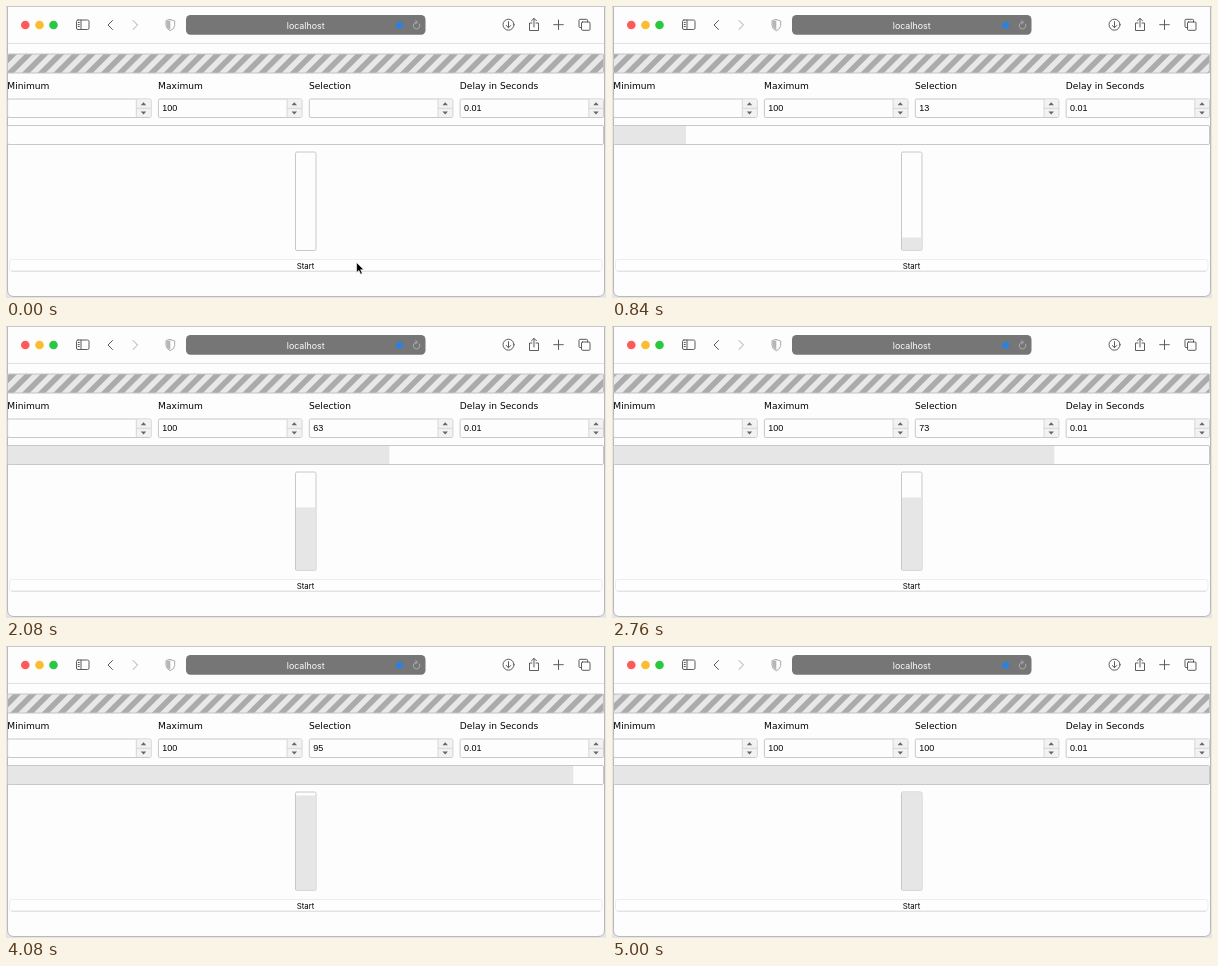
Recreate the animation shown at these times as an HTML page. Size 600x292 px, loop 5280 ms.

```html
<!DOCTYPE html>
<html lang="en">
<head>
<meta charset="utf-8">
<title>Progress bars</title>
<style>
  html, body { margin: 0; width: 100%; height: 100%; overflow: hidden; background: #e9e9e9; }
  svg { display: block; width: 600px; height: 292px; }
  text { fill: #000; font: 9px "Liberation Sans", Arial, sans-serif; }
  .label { font: 9.1px "DejaVu Sans", Verdana, sans-serif; }
  .address { font: 8.9px Inter, sans-serif; fill: #fff; }
  .start { font: 7.8px Inter, sans-serif; }
  .box { fill: #fefdfe; stroke: #c9c8c9; }
  .fill { fill: #e7e6e7; }
  .icon { fill: none; stroke: #5c5c5c; stroke-linecap: round; stroke-linejoin: round; }
  .faint { stroke: #a9a9a9; }
</style>
</head>
<body>
<svg viewBox="0 0 600 292">
  <defs>
    <clipPath id="stripClip"><rect x="2" y="48" width="596" height="19"/></clipPath>
  </defs>
  <path d="M0 0H600V292H0Z" fill="#e4e4e4"/>
  <path d="M1.5 0V284Q1.5 290.5 8 290.5H592Q598.5 290.5 598.5 284V0Z" fill="#fefdfe" stroke="#b9b9b9"/>
  <path d="M0 .5H600" stroke="#c9c9c9"/>
  <path d="M2 37.5H598" stroke="#e3e2e3"/>

  <circle cx="19.3" cy="19" r="4.3" fill="#fc5b57"/>
  <circle cx="33.5" cy="19" r="4.3" fill="#fdbc2e"/>
  <circle cx="47.5" cy="19" r="4.3" fill="#29c840"/>
  <g class="icon">
    <rect x="70.5" y="14" width="12.5" height="9.5" rx="1.5"/>
    <path d="M75 14V23.500M72.200 16.500H73.300M72.200 18.500H73.300M72.200 20.500H73.300"/>
    <path d="M106.500 14.500 102 19 106.500 23.500"/>
    <path class="faint" d="M127 14.500 131.500 19 127 23.500"/>
    <path class="faint" d="M164.300 13.500 168.700 15V19.500Q168.300 23 164.300 24.700 160.300 23 160 19.500V15Z"/>
    <circle cx="502.500" cy="18.700" r="5.500"/>
    <path d="M502.500 15.700V21.500M500.300 19.500 502.500 21.700 504.700 19.500"/>
    <path d="M526 17H523.500V24.500H532.500V17H530M528 21V12.500M525.500 14.800 528 12.300 530.500 14.800"/>
    <path d="M552.500 14V23.500M547.700 18.700H557.300"/>
    <path d="M575.500 21.500H574Q573 21.500 573 20.500V14.300Q573 13.300 574 13.300H580.500Q581.500 13.300 581.500 14.300V16"/>
    <rect x="575.500" y="16" width="8.500" height="8.300" rx="1"/>
  </g>
  <path d="M164.300 14.200 160.500 15.200V19.500Q161 22.500 164.300 24Z" fill="#b5b5b5"/>

  <rect x="180" y="9" width="239.500" height="19.700" rx="4.500" fill="#777677"/>
  <text class="address" x="299.700" y="22.500" text-anchor="middle">localhost</text>
  <path d="M390 17.500H392L395.200 15V23.500L392 21H390Z" fill="#1685fb"/>
  <path d="M396.800 17Q398.300 19.200 396.800 21.500" fill="none" stroke="#1685fb"/>
  <path d="M413.300 17.800A3.300 3.300 0 1 1 410.300 16.300M409.300 14.300 411.500 16.300 409.300 18" fill="none" stroke="#bbb" stroke-width=".8"/>

  <g clip-path="url(#stripClip)">
    <rect x="2" y="48" width="596" height="19" fill="#e9e8e9"/>
    <path id="stripes" fill="#acabac"/>
  </g>
  <rect x="1.500" y="48" width="596" height="19" rx="1" fill="none" stroke="#c4c3c4"/>

  <g id="fields"></g>

  <rect class="box" x="1.500" y="119.500" width="596" height="19" rx="1.500"/>
  <rect class="fill" id="across" x="2" y="120" height="18"/>
  <rect class="box" x="289.500" y="146" width="20.500" height="98.500" rx="1.500"/>
  <rect class="fill" id="upright" x="290" width="19.500"/>

  <rect x="3.500" y="253.500" width="592.500" height="11.500" rx="2.500" fill="#fefefe" stroke="#ededed"/>
  <path d="M5.500 265.300H594" stroke="#d9d9d9" stroke-width=".8"/>
  <text class="start" x="299.500" y="262.500" text-anchor="middle">Start</text>

  <path id="pointer" d="M0 0V10L2.300 7.900 4 11.700 5.700 11 4 7.200H7.200Z" fill="#000" stroke="#fff" stroke-width=".6"/>
</svg>
<script>
const LOOP = 5280;
const PITCH = 15.75;
const $ = id => document.getElementById(id);

// Each step: start time, selection, horizontal bar percent, stripe offset
const steps = [
  [0, 0, 0, 0], [280, 0, 0, 4], [560, 0, 0, 8], [840, 13, 12.1, 12],
  [1160, 29, 28, 2], [1480, 42, 43, 8], [1760, 55, 55, 12], [2080, 63, 64.1, 0],
  [2400, 69, 69, 5], [2760, 73, 74, 10], [3440, 86, 84.9, 12], [4080, 95, 95, 4],
  [4400, 100, 100, 0], [4720, 100, 100, 4], [5000, 100, 100, 8]
];

let bands = "";
for (let x = -3 * PITCH; x < 620; x += PITCH) bands += `M${x} 67l19-19h${PITCH / 2}l-19 19z`;
$("stripes").setAttribute("d", bands);

function field(x, label, value, id = "") {
  return `<text class="label" x="${x}" y="83">${label}</text>
    <rect class="box" x="${x + .3}" y="93" width="143.5" height="18.5" rx="1.5"/>
    <path d="M${x + 129} 93.500H${x + 143.300}V111H${x + 129}Z" fill="#f3f2f3"/>
    <path d="M${x + 129} 93V111.500M${x + 129} 102.300H${x + 143.500}" stroke="#d0cfd0" stroke-width=".8"/>
    <path d="M${x + 133.500} 99.300l2.700-3 2.700 3zM${x + 133.500} 105.500l2.700 3 2.700-3z" fill="#666"/>
    <text id="${id}" x="${x + 4.200}" y="105.300">${value}</text>`;
}
$("fields").innerHTML =
  field(1.3, "Minimum", "") + field(152.1, "Maximum", "100") +
  field(303, "Selection", "", "selection") + field(453.8, "Delay in Seconds", "0.01");

function draw(now) {
  const time = now % LOOP;
  const [start, value, percent, offset] = steps.findLast(step => step[0] <= time);
  const height = Math.min(value, 98);
  $("selection").textContent = value || "";
  $("across").setAttribute("width", percent * 5.95);
  $("upright").setAttribute("y", 244.5 - height);
  $("upright").setAttribute("height", height);
  $("stripes").setAttribute("transform", `translate(${offset})`);
  $("pointer").setAttribute("visibility", start < 840 ? "visible" : "hidden");
  $("pointer").setAttribute("transform", start < 280 ? "translate(350.600 256.500)" : "translate(350 261.500)");
  requestAnimationFrame(draw);
}
requestAnimationFrame(draw);
</script>
</body>
</html>
```
